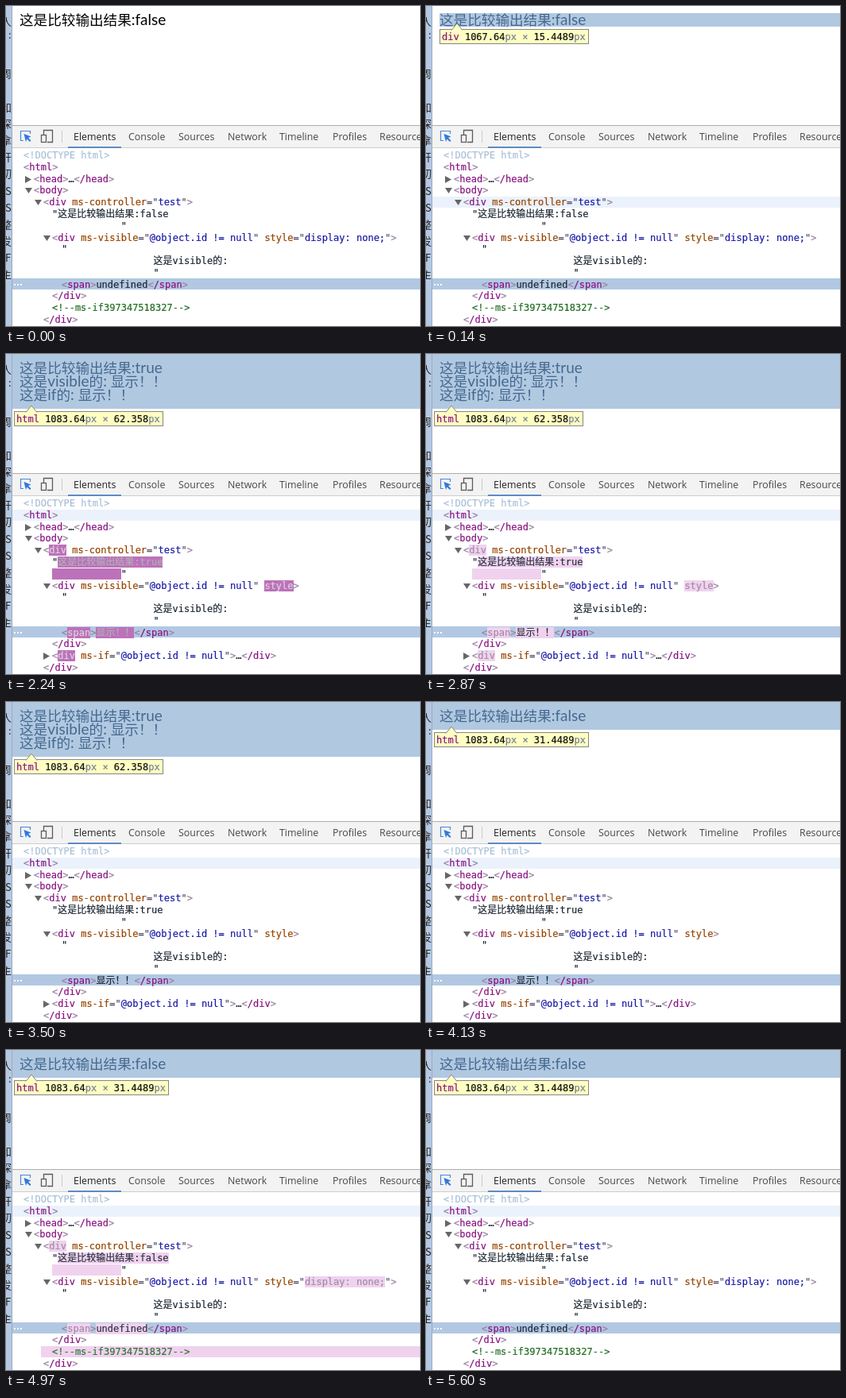
An HTML page for the animation above (6.86 s loop, 521 px wide and 403 px high).

```html
<!DOCTYPE html>
<html lang="zh-CN">
<head>
<meta charset="utf-8">
<title>Element inspector</title>
<style>
html, body { margin: 0; width: 100%; height: 100%; overflow: hidden; background: #fff; }
#stage { position: relative; width: 521px; height: 403px; overflow: hidden; background: #fff; }
#stage div, #stage svg { position: absolute; }
.strip { left: 0; top: 0; width: 7px; height: 403px; background: #b4c9e4; border-right: 1px solid #9ea8b4; overflow: hidden; }
.strip div { left: -6px; font: 13px/20px "Noto Sans CJK SC", sans-serif; color: #222; }
#shade { right: 0; background: #b1c8e1; }
.line { left: 17px; white-space: pre; font: 300 17.6px/17px Lato, "Noto Sans CJK SC", sans-serif; color: #000; }
.line span { font-size: 19px; font-weight: 400; line-height: 0; }
.shaded .line { color: #44698f; }
#tip, .row { font: 12px/14px "DejaVu Sans Mono", "Noto Sans CJK SC", monospace; white-space: pre; -webkit-text-stroke: 0.2px; }
#tip { padding: 2px 3px 1px 2px; background: #ffffc2; border: 1px solid #858585; color: #111; }
#tip svg { left: 13px; top: -9px; }
#tip b { font-weight: 400; color: #881280; }
#tip i { font-style: normal; color: #737f98; }
.bar { left: 8px; right: 0; top: 150px; height: 29px; background: #f3f3f3; border-top: 1px solid #adadad; border-bottom: 1px solid #cdcdcd; box-sizing: border-box; }
.tab { top: 156px; font: 12.4px/17px "Open Sans", "Noto Sans", sans-serif; color: #484848; white-space: pre; }
.tab.on { color: #222; }
.mark { left: 78px; top: 177px; width: 67px; height: 2px; background: #5f8ac4; }
.band { left: 8px; right: 0; height: 14px; }
#hover { background: #ebf2fc; }
.picked { top: 343px; background: #b2c8e2; }
.row { height: 14px; color: #1d2733; }
.tri { background: #666; }
.down { width: 9px; height: 7px; clip-path: polygon(0 0, 100% 0, 50% 100%); }
.side { width: 8px; height: 9px; clip-path: polygon(0 0, 100% 50%, 0 100%); }
.doc { color: #a9c0d8; }
.tag { color: #9a84a0; }
.name { color: #881280; }
.key { color: #994500; }
.eq { color: #55506e; }
.val { color: #1a1aa6; }
.note { color: #236e25; }
.wide { display: block; width: 463px; padding-left: 14px; }
</style>
</head>
<body>
<div id="stage">
  <div id="shade"></div>
  <div id="page"></div>
  <div id="tip"></div>
  <div class="bar"></div>
  <svg width="80" height="28" style="left:0;top:150px" fill="none">
    <path d="M22 19.5H18.5V7.500H30.500V11" stroke="#4c86d8" stroke-width="1.2"/>
    <path d="M22.500 11L31.500 14.500L28 16L31.500 19.500L30 21L26.500 17.500L25 21Z" fill="#3078dc"/>
    <path d="M47.500 12V6.500H58.500V21.500H52" stroke="#5c5c5c" stroke-width="1.3"/>
    <rect x="44.500" y="12.500" width="6" height="9" stroke="#5c5c5c" stroke-width="1.3"/>
    <path d="M70.500 7V22" stroke="#ccc"/>
  </svg>
  <div class="mark"></div>
  <div class="band" id="hover"></div>
  <div class="band picked"></div>
  <div id="tree"></div>
  <div id="off"></div>
  <div id="on"></div>
  <div class="strip"></div>
</div>
<script>
const $ = q => document.querySelector(q);
const LOOP = 6860, STEP = 70, FADE = 1400;

function put(parent, cls, left, top, html = "") {
  const el = document.createElement("div");
  el.className = cls;
  if (left !== null) el.style.left = left + "px";
  el.style.top = top + "px";
  el.innerHTML = html;
  parent.append(el);
  return el;
}

// markup helpers; the class "hot" flashes when the tree is updated
const span = (cls, text) => `<span class="${cls}">${text}</span>`;
const hot = text => span("hot", text);
const attr = (key, val, cls = "val") =>
  " " + span("key", key) + span("eq", '="') + span(cls, val) + span("eq", '"');
const open = (name, cls = "", attrs = "") =>
  span("tag", "&lt;" + span("name " + cls, name) + attrs + "&gt;");
const close = name => span("tag", "&lt;" + span("name", "/" + name) + "&gt;");

const rowTop = k => Math.round(181 + 14.79 * k);

function row(parent, k, x, html, arrow) {
  const top = rowTop(k);
  put(parent, "row", x, top, html);
  if (arrow) put(parent, "tri " + arrow, x - 11, top + (arrow === "down" ? 4 : 3));
}

const cond = "@object.id != null";
const pad = n => " ".repeat(n);

function buildShared(p) {
  row(p, 0, 22, span("doc", "&lt;!DOCTYPE html&gt;"));
  row(p, 1, 22, open("html"));
  row(p, 2, 35, open("head") + "…" + close("head"), "side");
  row(p, 3, 35, open("body"), "down");
  row(p, 8, 70, '"');
  row(p, 9, 70, pad(16) + "这是visible的:");
  row(p, 10, 70, pad(16) + '"');
  row(p, 12, 58, close("div"));
  row(p, 14, 47, close("div"));
  for (const x of [10, 14, 18]) {
    const dot = put(p, "", x, 350);
    dot.style.cssText += "width:2px;height:2px;background:#fff";
  }
}

function buildState(p, shown) {
  const style = shown ? " " + span("key hot", "style") : attr("style", "display: none;", "val hot");
  row(p, 4, 47, open("div", "hot", attr("ms-controller", "test")), "down");
  row(p, 5, 58, '"' + hot("这是比较输出结果:" + shown));
  row(p, 6, 58, hot(pad(12)) + '"');
  row(p, 7, 58, open("div", "", attr("ms-visible", cond) + style), "down");
  row(p, 11, 70, open("span", "hot") + hot(shown ? "显示！！" : "undefined") + close("span"));
  if (shown) row(p, 13, 58, open("div", "hot", attr("ms-if", cond)) + "…" + close("div"), "side");
  else row(p, 13, 44, span("note", span("hot wide", "&lt;!--ms-if397347518327--&gt;")));
}

buildShared($("#tree"));
buildState($("#off"), false);
buildState($("#on"), true);

const tabs = [["Elements", 85], ["Console", 154], ["Sources", 217], ["Network", 279],
  ["Timeline", 344], ["Profiles", 411], ["Resources", 470]];
tabs.forEach(([text, x], i) => put($("#stage"), i ? "tab" : "tab on", x, 156, text));

const edge = [["人", 20], [":", 36], ["周", 85], ["和", 128], ["深", 148], ["拿", 169], ["开", 190],
  ["切", 211], ["S", 233], ["S", 254], ["整", 275], ["发", 296], ["F", 317], ["主", 338]];
for (const [ch, y] of edge) {
  const el = put($(".strip"), "", null, y - 10, ch);
  if (ch < "a") el.style.left = ch === ":" ? "3px" : "-1px";
}

const latin = text => span("", text);
const result = put($("#page"), "line", 17, 9);
const extra = [
  put($("#page"), "line", 17, 26, "这是" + latin("visible") + "的" + latin(": ") + "显示！！"),
  put($("#page"), "line", 17, 43, "这是" + latin("if") + "的" + latin(": ") + "显示！！")
];
$("#page").style.cssText = "left:0;top:0";

// update flash: strong violet, then pale, then gone
const ease = "cubic-bezier(0, 0, 0.2, 1)";
function flashes(sel) {
  return [...document.querySelectorAll(sel + " .hot")].map(el => {
    const anim = el.animate([
      { offset: 0, backgroundColor: "rgb(158,54,153)", color: "#fff", easing: ease },
      { offset: 0.8, backgroundColor: "rgb(245,219,244)", color: "inherit", easing: ease },
      { offset: 1, backgroundColor: "rgba(245,219,244,0)" }
    ], { duration: FADE });
    anim.pause();
    return anim;
  });
}
const offFlash = flashes("#off"), onFlash = flashes("#on");

function seek(list, age) {
  const at = age >= 0 && age < FADE ? age : FADE;
  for (const a of list) a.currentTime = at;
}

function drawTip(name, w, h, x, y) {
  const tip = $("#tip");
  tip.style.left = x + "px";
  tip.style.top = y + "px";
  tip.innerHTML = '<svg width="16" height="10"><path d="M1 9.500L8 1L15 9.500" fill="#ffffc2" stroke="#858585"/></svg>' +
    `<b>${name}</b> ${w}<i>px × </i>${h}<i>px</i>`;
}

let last = "";
function drawPage(shown, hover) {
  const key = shown + hover;
  if (key === last) return;
  last = key;
  result.innerHTML = "这是比较输出结果" + latin(":" + shown);
  for (const el of extra) el.style.display = shown ? "" : "none";
  for (const id of ["#shade", "#tip", "#hover"]) $(id).style.display = hover ? "" : "none";
  $("#page").className = hover ? "shaded" : "";
  if (!hover) return;
  const inner = hover === "div";
  const bottom = inner ? 26 : shown ? 69 : 35;
  const top = inner ? 9 : 0, left = inner ? 17 : 8;
  $("#shade").style.cssText = `left:${left}px;top:${top}px;height:${bottom - top}px`;
  $("#hover").style.top = rowTop(inner ? 4 : 1) + "px";
  if (inner) drawTip("div", "1067.64", "15.4489", 17, 29);
  else drawTip("html", "1083.64", shown ? "62.358" : "31.4489", 10, bottom + 3);
}

function draw(now) {
  const t = Math.floor((now % LOOP) / STEP) * STEP;
  const hover = t < 70 ? "" : t >= 140 && t < 1540 ? "div" : "html";
  drawPage(t >= 2030 && t < 4130, hover);
  const shown = t >= 2100 && t < 4200;
  $("#on").style.display = shown ? "" : "none";
  $("#off").style.display = shown ? "none" : "";
  seek(onFlash, t - 2100);
  seek(offFlash, t - 4200);
}

const start = performance.now();
function tick() {
  draw(performance.now() - start);
  requestAnimationFrame(tick);
}
draw(0);
requestAnimationFrame(tick);
</script>
</body>
</html>
```
